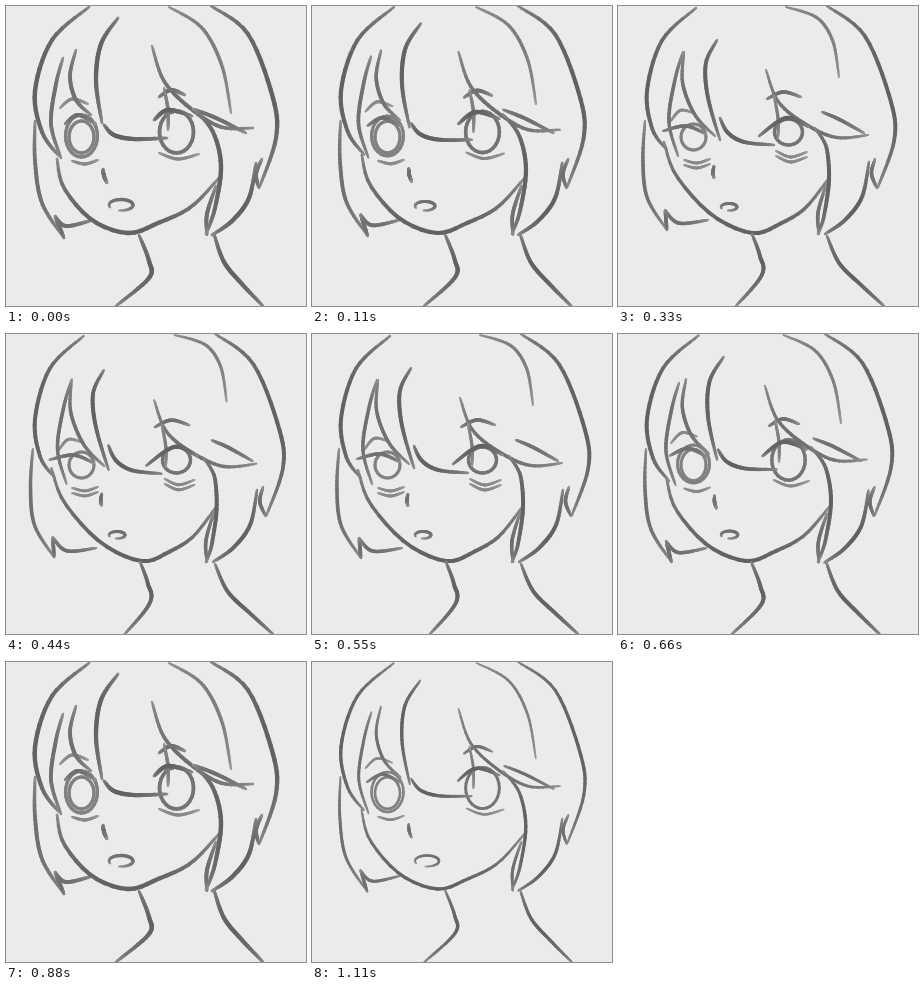
An HTML page with a canvas for the animation above (1.22 s loop, 300 by 300 pixels).

```html
<!DOCTYPE html>
<html lang="en">
<head>
<meta charset="utf-8">
<title>Head sketch</title>
<style>
html, body { margin: 0; width: 100%; height: 100%; overflow: hidden; background: #ebebeb; }
canvas { display: block; width: 100vw; height: 100vh; filter: blur(.5px); }
</style>
</head>
<body>
<canvas id="stage"></canvas>
<script>
const canvas = document.getElementById('stage');
const ctx = canvas.getContext('2d');
const SIZE = 300, STEPS = 28, LOOP = 1220;
const HEAVY = 1, MID = .75, LIGHT = .5, FAINT = .3;

// Catmull-Rom curve through "x,y x,y ...", evenly sampled
function sample(text) {
  const p = text.split(' ').map(s => s.split(',').map(Number));
  const last = p.length - 1;
  if (!last) return Array(STEPS + 1).fill(p[0]);
  return Array.from({ length: STEPS + 1 }, (_, k) => {
    const u = k / STEPS * last, i = Math.min(last - 1, Math.floor(u)), t = u - i;
    const b = p[i], c = p[i + 1], a = p[i - 1] || b, d = p[i + 2] || c;
    return [0, 1].map(n => b[n] + .5 * t * (c[n] - a[n] +
      t * (2 * a[n] - 5 * b[n] + 4 * c[n] - d[n] + t * (3 * (b[n] - c[n]) + d[n] - a[n]))));
  });
}

// A line and how far its points travel as the head turns fully
const line = (tone, path, travel) => ({ tone, path: sample(path), travel: sample(travel) });

const hair = [
  line(HEAVY, '83,1 46,34 29,85 36,126 53,150', '-5,1 0,0 -4,-6'),
  line(MID, '55,152 45,118 50,78 57,52', '5,-2 8,-6'),
  line(MID, '70,44 64,70 70,94 85,109', '-4,2 12,21'),
  line(HEAVY, '112,12 95,38 90,75 96,117', '-13,22 6,17'),
  line(HEAVY, '98,119 108,129 128,133 161,132', '4,-7 -5,7'),
  line(MID, '146,40 158,75 184,102 215,121 247,122', '2,24 3,7'),
  line(LIGHT, '158,82 162,104 162,124', '-2,8'),
  line(MID, '187,103 210,112 240,127', '17,3 6,0'),
  line(MID, '29,115 29,155 36,197 58,232', '-2,0 -9,-8'),
  line(MID, '58,232 49,210', '-9,-8 -2,-6'),
  line(MID, '49,210 60,220 87,214', '-2,-6 3,0'),
  line(HEAVY, '205,0 242,28 267,92 270,132 254,180', '4,0 6,4 6,1'),
  line(MID, '253,182 250,168 256,153', '6,0 1,0'),
  line(HEAVY, '250,157 243,192 226,215 206,229', '1,-1'),
  line(MID, '201,229 201,208 210,180', '0,-1 -2,-1'),
  line(LIGHT, '163,1 196,22 216,60 225,107', '5,0 -4,-36')
];
const body = [
  line(HEAVY, '51,153 58,182 86,214 122,227 152,217 185,201 213,172', '-5,-17 12,0 -2,0'),
  line(HEAVY, '189,104 207,126 215,160 209,202 200,228', '8,18 -4,14 0,0'),
  line(HEAVY, '133,229 143,255 143,272 110,300', '1,-1 -1,-6 8,0'),
  line(HEAVY, '208,228 218,256 236,278 257,300', '1,2 9,0'),
  line(MID, '97,163 98,170 101,177', '-1,-3 -5,-5')
];
const brows = [
  line(FAINT, '54,102 66,93 82,98', '-2,14 -6,9'),
  line(MID, '153,91 165,84 179,89', '-4,2 4,2')
];
const lashes = [
  line(MID, '59,118 72,109 90,118', '-14,7 -4,11 -2,10'),
  line(HEAVY, '148,114 162,104 186,110', '-7,16 6,8 5,11')
];
const bags = [
  line(FAINT, '66,155 79,158 92,154', '0,-1'),
  line(FAINT, '153,147 172,153 193,148', '5,-2 -4,-2')
];

// One pen mark, thinner and paler towards its ends
function mark(points, tone, weight, closed) {
  for (let i = 0; i < STEPS; i++) {
    const press = closed ? .9 : Math.sin((i + .5) / STEPS * Math.PI) ** .5;
    const grey = Math.round(182 - 84 * (.35 + .65 * tone) * (.4 + .6 * press));
    ctx.strokeStyle = `rgb(${grey},${grey},${grey})`;
    ctx.lineWidth = (2.4 + 1.6 * tone) * weight * (.5 + .5 * press);
    ctx.beginPath();
    ctx.moveTo(...points[i]);
    ctx.lineTo(...points[i + 1]);
    ctx.stroke();
  }
}

function oval(cx, cy, rx, ry, from = 0, sweep = Math.PI * 2) {
  return Array.from({ length: STEPS + 1 }, (_, k) => {
    const a = from + sweep * k / STEPS;
    return [cx + rx * Math.cos(a), cy + ry * Math.sin(a)];
  });
}

function draw({ turn, open, mouth, weight }) {
  const pen = (lines, dy = 0) => lines.forEach(({ tone, path, travel }) =>
    mark(path.map(([x, y], i) => [x + travel[i][0] * turn, y + travel[i][1] * turn + dy]), tone, weight));

  ctx.setTransform(canvas.width / SIZE, 0, 0, canvas.height / SIZE, 0, 0);
  ctx.fillStyle = '#ebebeb';
  ctx.fillRect(0, 0, SIZE, SIZE);
  ctx.lineCap = 'round';

  pen(bags);
  if (open < .3) pen(bags, 5);
  pen(brows);
  mark(oval(75.5, 131, 12.5, 13 + 3 * open), LIGHT, weight, true);
  if (open > .3) mark(oval(75.5, 130, 16, 21 * open), LIGHT, weight, true);
  mark(oval(170.5, 126, 14 + 3 * open, 13 + 8 * open), MID, weight, true);
  mark(oval(111 + 4 * mouth, 201 - 2 * mouth, 8 + 4 * mouth, 3.5 + 2 * mouth, 2.7, 5.3), MID, weight * .85);
  pen(hair);
  pen(body);
  pen(lashes);
}

const wide = { turn: 0, open: 1, mouth: 1, weight: 1.1 };
const between = { turn: .25, open: .95, mouth: .5, weight: 1.05 };
const calm = { turn: .5, open: .9, mouth: .1, weight: 1 };
const sleepy = { turn: 1, open: 0, mouth: 0, weight: 1 };
const deep = { ...sleepy, turn: 1.1 };
const startled = { turn: .3, open: .95, mouth: 1, weight: .85 };

const timeline = [
  [0, wide], [110, between], [220, calm], [330, sleepy], [440, deep],
  [550, sleepy], [660, calm], [770, between], [880, wide], [1110, startled]
];

let current;
function fit() {
  canvas.width = Math.round(innerWidth * devicePixelRatio);
  canvas.height = Math.round(innerHeight * devicePixelRatio);
  current = null;
}

const start = performance.now();
function tick() {
  const t = (performance.now() - start) % LOOP;
  const pose = timeline.filter(([from]) => from <= t).pop()[1];
  if (pose !== current) draw(current = pose);
  requestAnimationFrame(tick);
}

addEventListener('resize', fit);
fit();
tick();
</script>
</body>
</html>
```
